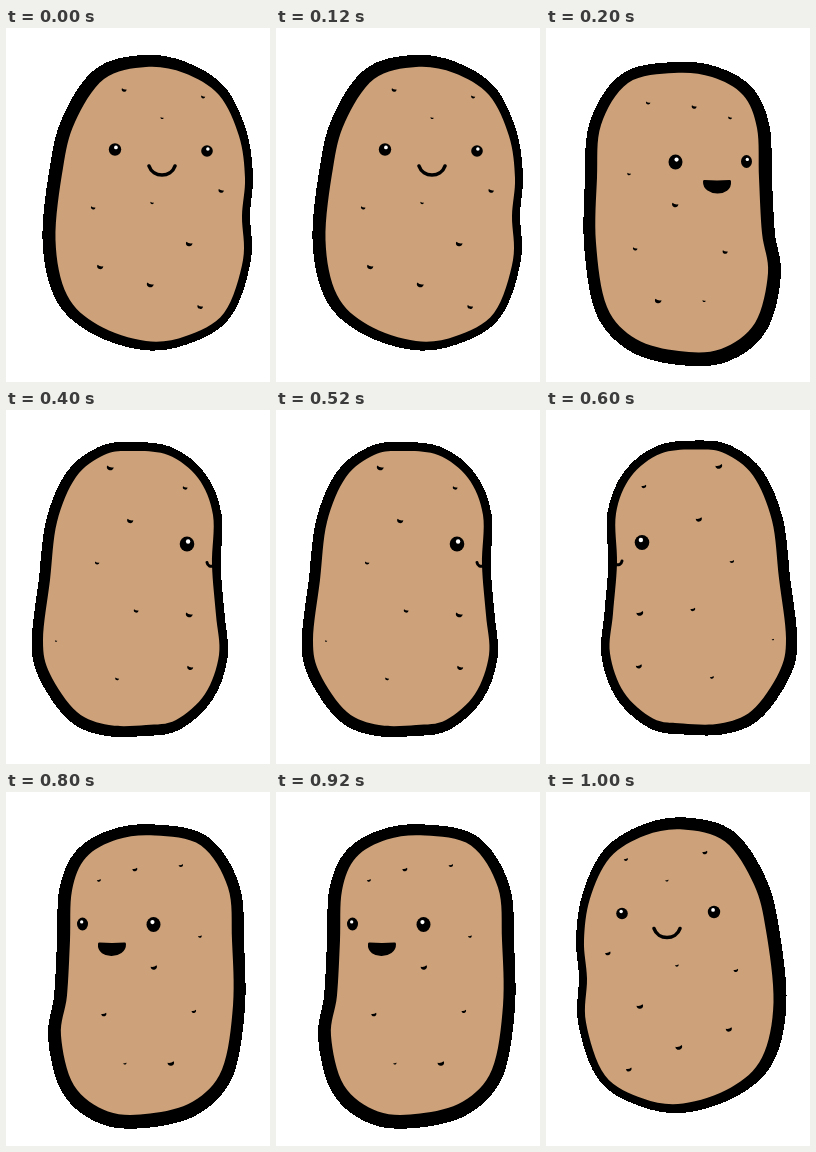
An HTML page that plays this animation: 264x354 px, repeating every 1.2 s.

```html
<!DOCTYPE html>
<html lang="en">
<head>
<meta charset="utf-8">
<title>Spinning potato</title>
<style>
  html, body { margin: 0; width: 100%; height: 100%; overflow: hidden; background: #fff; }
  svg { display: block; width: 100%; height: 100%; }
  .rind { stroke: #000; stroke-linejoin: round; shape-rendering: crispEdges; }
  .flesh { fill: #cda27a; }
  .mouth { stroke: #000; stroke-linecap: round; stroke-linejoin: round; }
</style>
</head>
<body>
<svg id="stage" viewBox="0 0 264 354"></svg>
<script>
const STEP = 200;   // ms per view
const AXIS = 277;   // mirrored x = AXIS - x
const LIFT = -1.5;  // mirrored views sit slightly higher

// rind: thickness and offset; spots: x, y, radius; eyes: x, y, rx, ry
const front = {
  rind: [10.5, -2.5, -1.5],
  outline: '140,39 178,45 213,67 233,108 239,150 236,188 237,232 218,285 180,308 140,313 92,297 61,267 49.5,212 57,140 69,94 98,51',
  spots: '118,62,2.4 156,90,1.5 197,69,2 87,180,2.2 146,175,1.7 215,163,2.6 183,216,3.2 94,239,3 144,257,3.3 194,279,2.7',
  eyes: '109,121.5,6.2,6.2 201,123,5.8,5.8',
  mouth: ['M143 138C147 150 165 150 169 138', 3.6, 'none']
};
const turned = {
  rind: [12.5, 0.5, 1.5],
  outline: '128,45 166,49 197,67 211,100 213,150 216,205 222,245 209,295 175,321 133,323 90,311 61,279 50,215 51,150 55,97 82,55',
  spots: '102,75,2.1 148,79,2.4 184,90,1.9 83,146,1.8 129,177,3.1 89,221,2.2 179,224,2.5 112,273,3.2 158,273,1.5',
  eyes: '129.5,134,7,7.4 200.5,133.5,5.5,6.4',
  mouth: ['M158.5 153.5Q171 154.5 183.5 153.5C185 168 158 167 158.5 153.5Z', 3, '#000']
};
const side = {
  rind: [10, -1.3, 1],
  outline: '125,41 162,45 192,68 207,105 206,155 210,205 213,245 199,284 170,310 140,315 103,315 71,302 44,264 37,230 44,170 51,112 70,67 98,45',
  spots: '104,58,3.3 179,78,2.3 124,111,3 91,153,2.1 130,201,2.3 183,205,3.3 50,231,1.1 184,258,2.9 111,269,1.9',
  eyes: '181,134,7.3,7.4',
  mouth: ['M201 152.5Q202 157.5 208 156', 3, 'none']
};

const parse = text => text.split(' ').map(item => item.split(',').map(Number));

// Smooth closed curve through the points
function smooth(points) {
  const n = points.length;
  const at = i => points[(i + n) % n];
  const curves = points.map((b, i) => {
    const a = at(i - 1), c = at(i + 1), e = at(i + 2);
    const p = b.map((v, j) => v + (c[j] - a[j]) / 6);
    const q = c.map((v, j) => v - (e[j] - b[j]) / 6);
    return `C${p} ${q} ${c}`;
  });
  return `M${points[0]}${curves.join('')}Z`;
}

const spot = ([x, y, r]) =>
  `<path transform="translate(${x} ${y}) rotate(15) scale(${r})" d="M-1-.5Q0 0 1-.5C1.3 1.1-1.3 1.1-1-.5Z"/>`;

const eye = ([x, y, rx, ry]) =>
  `<ellipse cx="${x}" cy="${y}" rx="${rx}" ry="${ry}"/>
   <circle cx="${x + rx * 0.15}" cy="${y - ry * 0.33}" r="${rx * 0.3}" fill="#fff"/>`;

function potato(pose, flip) {
  const body = smooth(parse(pose.outline));
  const [thick, dx, dy] = pose.rind;
  const [line, weight, fill] = pose.mouth;
  const place = flip ? `matrix(-1 0 0 1 ${AXIS} ${LIFT})` : '';
  return `<g transform="${place}" visibility="hidden">
    <path class="rind" d="${body}" stroke-width="${thick * 2}" transform="translate(${dx} ${dy})"/>
    <path class="flesh" d="${body}"/>
    ${parse(pose.spots).map(spot).join('')}
    ${parse(pose.eyes).map(eye).join('')}
    <path class="mouth" d="${line}" stroke-width="${weight}" fill="${fill}"/>
  </g>`;
}

const poses = [front, turned, side];
const stage = document.getElementById('stage');
stage.innerHTML = [
  ...poses.map(pose => potato(pose, false)),
  ...poses.toReversed().map(pose => potato(pose, true))
].join('');
const views = [...stage.children];

let start = null;
function draw(now) {
  start ??= now;
  const current = Math.floor(Math.max(0, now - start) / STEP) % views.length;
  views.forEach((view, i) => view.setAttribute('visibility', i === current ? 'visible' : 'hidden'));
  requestAnimationFrame(draw);
}
draw(performance.now());
</script>
</body>
</html>
```
